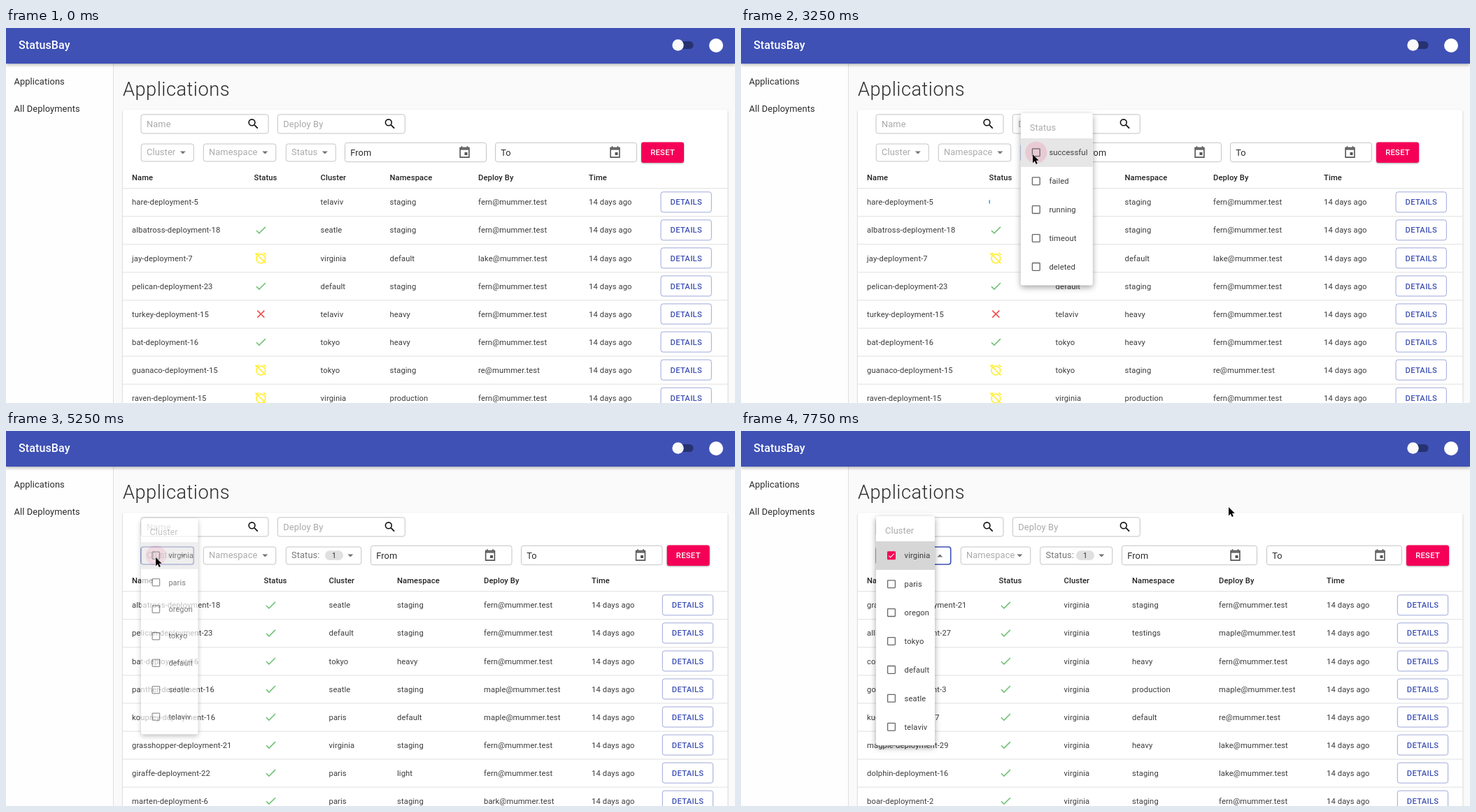
An HTML page that plays this animation: 1042 by 537 pixels, repeating every 8 s.

```html
<!DOCTYPE html>
<html>
<head>
<meta charset="utf-8">
<style>
html, body { margin: 0; width: 100%; height: 100%; overflow: hidden; background: #fafafa; }
svg { display: block; font-family: Roboto, "Open Sans", sans-serif; }
text { white-space: pre; }
.bar { filter: drop-shadow(0 2px 2px rgba(0,0,0,.28)); }
.paper { filter: drop-shadow(0 1px 1px rgba(0,0,0,.28)); }
.menu { filter: drop-shadow(0 3px 4px rgba(0,0,0,.36)); }
.reset { filter: drop-shadow(0 1px 1px rgba(0,0,0,.35)); }
</style>
</head>
<body>
<svg id="stage" width="1042" height="537" viewBox="0 0 1042 537"></svg>
<script>
const LOOP = 8000, STEP = 250;
const INK = '#2b2b2b', FAINT = '#aaa', BLUE = '#3f51b5', PINK = '#f50057';

const HOST = '@mummer.test';
const LAYOUTS = {
  wide: { cols: [180, 354.5, 449.5, 548.5, 675, 833], button: 936 },
  shifted: { cols: [180, 368.5, 461.5, 559, 683, 837], button: 938.3 }
};

// animal, number, status, cluster, namespace, deployed by
const parse = s => s.trim().split('\n').map(line => line.trim().split(' '));
const TABLES = [
  parse(`hare 5 run telaviv staging fern
    albatross 18 ok seatle staging fern
    jay 7 late virginia default lake
    pelican 23 ok default staging fern
    turkey 15 bad telaviv heavy fern
    bat 16 ok tokyo heavy fern
    guanaco 15 late tokyo staging re
    raven 15 late virginia production fern`),
  parse(`albatross 18 ok seatle staging fern
    pelican 23 ok default staging fern
    bat 16 ok tokyo heavy fern
    panther 16 ok seatle staging maple
    kouprey 16 ok paris default maple
    grasshopper 21 ok virginia staging fern
    giraffe 22 ok paris light fern
    marten 6 ok paris staging bark`),
  parse(`grasshopper 21 ok virginia staging fern
    alligator 27 ok virginia testings maple
    cod 13 ok virginia heavy fern
    goldfish 3 ok virginia production maple
    kudu 17 ok virginia default re
    magpie 29 ok virginia heavy lake
    dolphin 16 ok virginia staging lake
    boar 2 ok virginia staging fern`)
];

const FILTERS = [
  { cluster: [193, 75.5], space: [282, 104], status: [400, 71.5], from: 484.5, to: 699.5, field: 202, reset: 908 },
  { cluster: [193, 75.5], space: [282, 104], status: [400, 108], from: 521.5, to: 736.5, field: 201.5, reset: 944.7 },
  { cluster: [193, 107], space: [314, 100], status: [427.5, 103.5], from: 544.5, to: 751.5, field: 193, reset: 951 }
];

const STATUSES = ['successful', 'failed', 'running', 'timeout', 'deleted'];
const CLUSTERS = ['virginia', 'paris', 'oregon', 'tokyo', 'default', 'seatle', 'telaviv'];

// time, x, y of the pointer tip
const POINTER = [
  [250, 487, 61], [1250, 434, 176], [2000, 430, 199], [2500, 427, 196], [3250, 417, 181], [3500, 417, 181],
  [4000, 299, 190], [4250, 264, 189], [4750, 222, 184], [5000, 214, 181], [5500, 214, 181],
  [6500, 210, 175], [7000, 210, 175], [7750, 697, 109]
];

const text = (x, y, s, size = 11.2, fill = INK, weight = 400, gap = .0107, anchor = 'start') =>
  `<text x="${x}" y="${y}" font-size="${size}" fill="${fill}" font-weight="${weight}" letter-spacing="${gap * size}" text-anchor="${anchor}">${s}</text>`;
const rect = (x, y, w, h, fill, more = '') =>
  `<rect x="${x}" y="${y}" width="${w}" height="${h}" fill="${fill}" ${more}/>`;
const circle = (x, y, r, fill, more = '') =>
  `<circle cx="${x}" cy="${y}" r="${r}" fill="${fill}" ${more}/>`;
const path = (d, fill, more = '') => `<path d="${d}" fill="${fill}" ${more}/>`;
const outline = (x, y, w, h, color = '#c4c4c4', width = 1) =>
  rect(x, y, w, h, 'none', `rx="3.2" stroke="${color}" stroke-width="${width}"`);
// Icons live on a 24-unit grid centred on x, y.
const icon = (x, y, body, size = 19.2) =>
  `<g transform="translate(${x} ${y}) scale(${size / 24}) translate(-12 -12)">${body}</g>`;
const stroke = (color, width = 2) => `stroke="${color}" stroke-width="${width}"`;

const CHECK = 'M9 16.2L4.8 12l-1.4 1.4L9 19 21 7l-1.4-1.4z';
const ICONS = {
  ok: path(CHECK, '#6fc274'),
  bad: path('M5.7 5.7L18.3 18.3M18.3 5.7L5.7 18.3', 'none', stroke('#ef5350')),
  late: circle(12, 13, 8, 'none', stroke('#ffee33')) +
    path('M2.3 3L20.7 21.3M16.8 2.6L21.4 6.5M2.6 6.5L7.6 2.6', 'none', stroke('#ffee33')),
  search: circle(9.5, 9.5, 5.5, 'none', stroke('#111')) + path('M14 14L19.8 19.8', 'none', stroke('#111', 2.2)),
  calendar: path('M4 4h16v16.9H4zM4 6.5H20M7 1V5M17 1V5', 'none', stroke('#555')) + rect(12, 12, 5, 5, '#555')
};

function spinner(t) {
  const p = t % 1900 / 1900, grow = Math.sin(Math.PI * p);
  const r = 3 + 7.5 * grow, len = .25 + .45 * grow, a = (-75 + 360 * p) * Math.PI / 180;
  const at = b => `${364 + r * Math.cos(b)} ${249 + r * Math.sin(b)}`;
  return path(`M${at(a - len / 2)}A${r} ${r} 0 0 1 ${at(a + len / 2)}`, 'none',
    stroke('#29a9dc', 1.5) + ` opacity="${Math.min(1, .2 + p * 12)}"`);
}

function frame() {
  return rect(0, 51, 153, 486, '#fefefe') + rect(153, 51, 1, 486, '#e0e0e0') +
    rect(0, 0, 1042, 51, BLUE, 'class="bar"') +
    text(18, 30.3, 'StatusBay', 16, '#fff', 500, .0075) +
    rect(955, 19, 27.5, 11, '#273270', 'rx="5.5"') + circle(960.5, 24.5, 8.2, '#fafafa') +
    circle(1015, 25, 10, '#fff') +
    text(11.5, 81, 'Applications', 12.8, INK, 400, .0094) +
    text(11.5, 120, 'All Deployments', 12.8, INK, 400, .0094) +
    text(167, 96.5, 'Applications', 27.2, INK, 300, .019) +
    rect(167, 117, 864.5, 440, '#fff', 'rx="3.2" class="paper"');
}

function dropdown([x, w], label, count, focused, open) {
  const ax = x + w - 15.7, dy = open ? -2 : 2;
  let s = outline(x + .25, 166, w - .5, 25, focused ? BLUE : '#c4c4c4', focused ? 1.6 : 1);
  s += text(x + 8, 182.4, label + (count ? ':' : ''), 12.8, count ? '#777' : FAINT, 400, .0094);
  if (count) {
    const cx = x + w - 39;
    s += rect(cx - 13, 171.3, 26, 13.8, '#e0e0e0', 'rx="6.9"') + text(cx, 182, '1', 10.4, INK, 400, 0, 'middle');
  }
  return s + path(`M${ax - 4} ${178.5 - dy}h8l-4 ${2 * dy}z`, '#757575');
}

function filters(n, focus, open) {
  const f = FILTERS[n];
  const search = (x, label) => outline(x, 123.8, 182, 27.2) +
    text(x + 8, 142.3, label, 12.8, FAINT, 400, .0094) + icon(x + 160.5, 137.3, ICONS.search);
  const date = (x, label) => outline(x, 164.3, f.field, 27.4) +
    text(x + 7.7, 183, label, 12.8, INK, 400, .0094) + icon(x + f.field - 31, 178, ICONS.calendar);
  return search(193, 'Name') + search(388.3, 'Deploy By') +
    dropdown(f.cluster, 'Cluster', n > 1, focus === 'Cluster', open === 'Cluster') +
    dropdown(f.space, 'Namespace') +
    dropdown(f.status, 'Status', n > 0, focus === 'Status', open === 'Status') +
    date(f.from, 'From') + date(f.to, 'To') +
    rect(f.reset, 163.6, 61, 29.4, PINK, 'rx="3.2" class="reset"') +
    text(f.reset + 30.6, 182.3, 'RESET', 11.2, '#fff', 500, .0286, 'middle');
}

function table(n, t) {
  const { cols, button } = n ? LAYOUTS.shifted : LAYOUTS.wide;
  let s = ['Name', 'Status', 'Cluster', 'Namespace', 'Deploy By', 'Time']
    .map((h, i) => text(cols[i], 218.3, h, 11.2, '#222', 500)).join('');
  TABLES[n].forEach(([animal, num, status, cluster, space, user], i) => {
    const y = 249.4 + 40.05 * i;
    const cells = [`${animal}-deployment-${num}`, '', cluster, space, user + HOST, '14 days ago'];
    s += rect(167, y - 20.2, 864.5, 1, '#e0e0e0');
    s += cells.map((c, j) => text(cols[j], y + 4, c, 11.2, '#3c3c3c')).join('');
    s += status === 'run' ? spinner(t) : icon(cols[1] + 9.8, y, ICONS[status]);
    s += outline(button, y - 14.6, 72.3, 29, '#9fa8da') +
      text(button + 36.3, y + 4, 'DETAILS', 11.2, BLUE, 500, .0286, 'middle');
  });
  return s;
}

function menu(x, w, title, items, { scale, alpha, checked, pulse, pressed }) {
  const cx = x + 22;
  let s = rect(x, 122, w, 42 + 40.9 * items.length, '#fff', 'rx="3.2" class="menu"') +
    text(x + 13, 147, title, 12.8, FAINT, 400, .0094) +
    rect(x, 158, w, 40.9, checked ? '#d6d6d6' : '#e6e6e6');
  if (pressed) s += path(`M${x} 158H240A35 35 0 0 1 240 198.9H${x}z`, '#d2d2d2');
  if (!checked) s += circle(cx, 178.3, pulse, PINK, 'opacity=".12"');
  items.forEach((label, i) => {
    const y = 178.3 + 40.9 * i;
    s += checked && !i
      ? rect(cx - 6, y - 6, 12, 12, PINK, 'rx="1.3"') + icon(cx, y, path(CHECK, '#fff'), 11.5)
      : rect(cx - 5.4, y - 5.4, 10.8, 10.8, 'none', 'rx=".8" ' + stroke('#666', 1.3));
    s += text(x + 40.6, y + 4, label, 11.2, '#3c3c3c');
  });
  return `<g opacity="${alpha}" transform="translate(${x} 178) scale(${scale} ${scale * scale}) translate(${-x} -178)">${s}</g>`;
}

function pointer(t) {
  if (t < POINTER[0][0]) return '';
  const i = POINTER.findIndex(p => p[0] >= t);
  const b = POINTER[i < 0 ? POINTER.length - 1 : i], a = POINTER[Math.max(0, i - 1)];
  const k = i > 0 ? (t - a[0]) / (b[0] - a[0]) : 1;
  const x = a[1] + (b[1] - a[1]) * k, y = a[2] + (b[2] - a[2]) * k;
  return i < 0 ? '' : path('M0 0V12.2L2.8 9.6L4.8 14L6.8 13.1L4.9 8.8H8.7z', '#000',
    `transform="translate(${x} ${y})" stroke="#fff" stroke-width="1" paint-order="stroke"`);
}

function draw(t) {
  const within = (a, b) => t >= a && t < b;
  const chosen = t >= 7000 ? 2 : t >= 3500 ? 1 : 0;
  const rows = t >= 7750 ? 2 : t >= 4000 ? 1 : 0;
  const open = within(1500, 4500) ? 'Status' : t >= 5250 ? 'Cluster' : '';
  const focus = t >= 5000 ? 'Cluster' : within(1250, 4750) ? 'Status' : '';
  const moving = [1500, 4250, 5250].includes(t);
  const look = {
    scale: moving ? .97 : 1,
    alpha: moving ? .68 : 1,
    checked: chosen === (open === 'Status' ? 1 : 2),
    pulse: 15 + .6 * Math.sin(t / 400),
    pressed: t === 6750
  };
  let s = frame() + filters(chosen, focus, moving ? '' : open) + table(rows, t);
  if (open === 'Status') s += menu(399.8, 103, 'Status', STATUSES, look);
  if (open === 'Cluster') s += menu(193, 84, 'Cluster', CLUSTERS, look);
  stage.innerHTML = s + pointer(t);
}

const stage = document.getElementById('stage');
let shown = -1;
function tick() {
  const t = Math.floor(performance.now() % LOOP / STEP) * STEP;
  if (t !== shown) draw(shown = t);
  requestAnimationFrame(tick);
}
tick();
</script>
</body>
</html>
```
